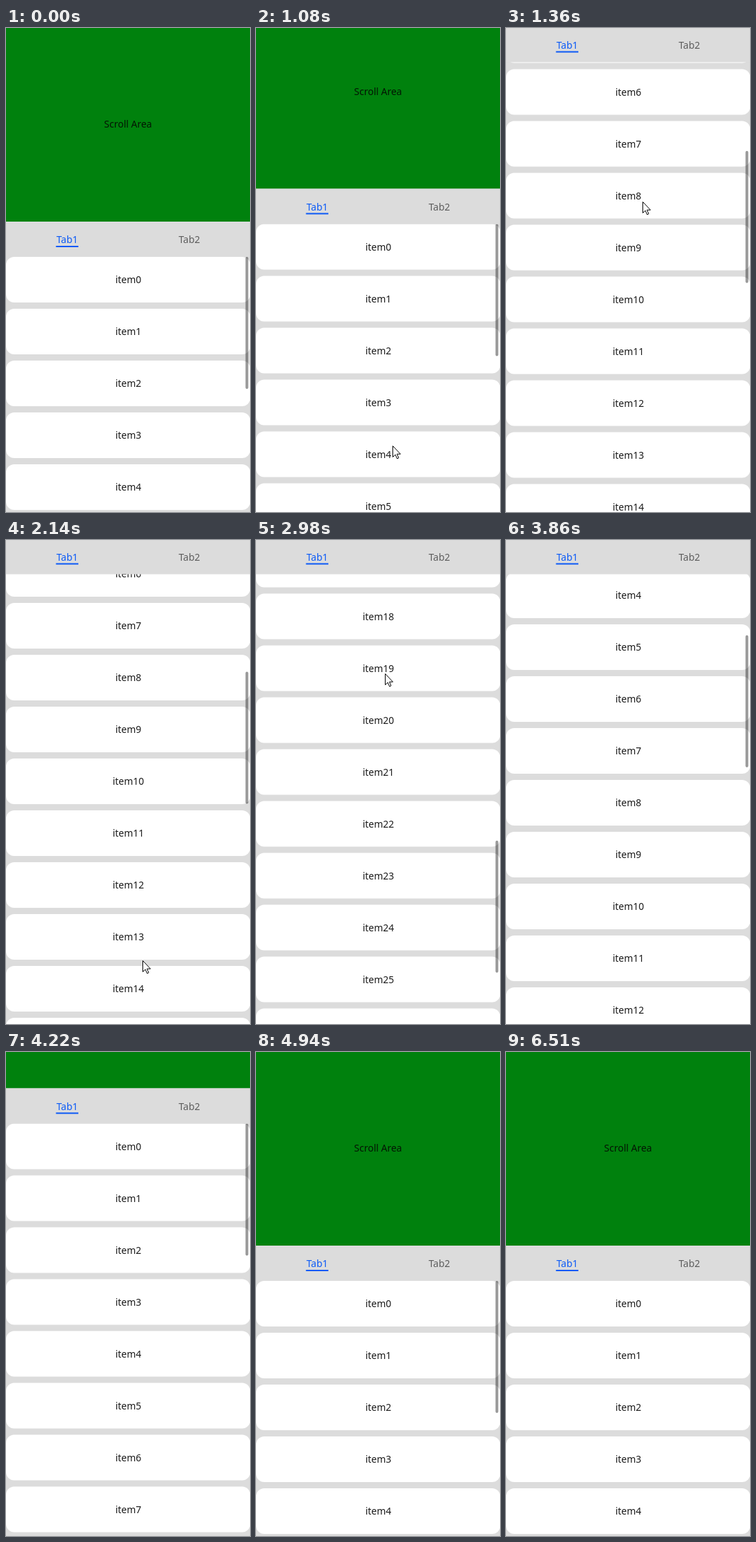
These frames come from a looping animation (354 px wide and 700 px high, 6.59 s). An HTML page:

```html
<!DOCTYPE html>
<html lang="en">
<head>
<meta charset="utf-8">
<title>Nested scroll</title>
<style>
  html, body { margin: 0; width: 100%; height: 100%; overflow: hidden; background: #dcdcdc; }
  svg { display: block; width: 100vw; height: 100vh; }
  text { font: 14px "Noto Sans", sans-serif; text-anchor: middle; fill: #1c1c1c; }
</style>
</head>
<body>
<svg viewBox="0 0 354 700">
  <rect width="354" height="700" fill="#dcdcdc"/>
  <g id="list"></g>
  <rect id="thumb" x="347.5" width="4" height="191" rx="2" fill="#000" fill-opacity=".4"/>
  <g id="head">
    <rect width="354" height="280" fill="#00810d"/>
    <text x="177" y="144" style="fill:#041604">Scroll Area</text>
    <rect y="280" width="354" height="51" fill="#dcdcdc"/>
    <text x="88.7" y="311" style="fill:#0a59f7">Tab1</text>
    <rect x="72.5" y="315" width="32.5" height="2" fill="#0a59f7"/>
    <text x="266" y="311" style="fill:#5c5c5c">Tab2</text>
  </g>
  <path id="cursor" d="M.5 .5V16.5L4.2 13.1L6.7 18.8L9 17.8L6.6 12.2H11.6Z" fill="#fff" stroke="#000"/>
</svg>
<script>
const LOOP = 6590, HEAD = 281.5, TOP = 331, PITCH = 75, COUNT = 30;
const PULL = 3260, FLING = 3460;
const $ = id => document.getElementById(id);
const list = $('list'), head = $('head'), thumb = $('thumb'), cursor = $('cursor');

list.innerHTML = Array.from({ length: COUNT }, (_, i) => {
  const y = TOP + i * PITCH;
  return `<rect y="${y}" width="354.5" height="66" rx="12" fill="#fff"/>` +
    `<text x="177.5" y="${y + 38}">item${i}</text>`;
}).join('');

const progress = (t, start, length) => Math.min(1, Math.max(0, (t - start) / length));
const mix = (a, b, u) => a + (b - a) * u;
const easeOut = u => 1 - (1 - u) ** 2;

// A swipe drags slowly, then flicks and settles
const swipe = (t, start, distance, length = 560) =>
  distance * (1 - Math.cos(Math.PI * progress(t, start, length) ** 2.6)) / 2;

// A pull down that keeps speeding up
const pull = t => 114 * (Math.max(0, t - PULL) / (FLING - PULL)) ** 2;

const first = t => swipe(t, 800, 721.5);
const second = t => swipe(t, 1860, 660);
const third = t => 258.5 * easeOut(progress(t, 2580, 640));

const dragged = t => first(t) + second(t) + third(t) - pull(t);

// After release the fling decays exponentially, stopping at the top
function scrollAt(t) {
  if (t <= FLING) return dragged(t);
  const rest = 56;
  return Math.max(0, (dragged(FLING) + rest) * Math.exp((FLING - t) / 442) - rest);
}

function cursorAt(t) {
  const enter = easeOut(progress(t, 120, 640));
  const aim = easeOut(progress(t, 2580, 640));
  const moved = Math.min(400, t < 1860 ? first(t) : second(t));
  return [
    mix(13, 198, enter) - 13 * aim,
    mix(682, 651, enter) - moved - 68 * aim + pull(t)
  ];
}

// Opacity falls in three equal steps
const fade = (t, start, step) =>
  t < start ? 1 : Math.max(0, 2 - Math.floor((t - start) / step)) / 3;

// The screen refreshes every 40 ms and stalls between the first two swipes
function tick(t) {
  if (t > 1360 && t < 1900) return 1360;
  const base = t < 1900 ? 0 : 1900;
  return base + Math.floor((t - base) / 40) * 40;
}

const move = (el, x, y) => el.setAttribute('transform', `translate(${x} ${y})`);

function draw(time) {
  const t = tick(time), s = Math.round(scrollAt(t) * 2) / 2;
  const outer = Math.min(s, HEAD), inner = s - outer;
  move(list, 0, -s);
  move(head, 0, -outer);
  thumb.setAttribute('y', TOP - outer + inner * .2915);
  thumb.setAttribute('opacity', time < 800 ? fade(time, 120, 40) : fade(time, 6270, 120));

  const [x, y] = cursorAt(t).map(Math.round);
  move(cursor, x, y);
  cursor.setAttribute('visibility', t >= 120 && y < 700 ? 'visible' : 'hidden');
}

const start = performance.now();
function frame() {
  draw((performance.now() - start) % LOOP);
  requestAnimationFrame(frame);
}
frame();
</script>
</body>
</html>
```
